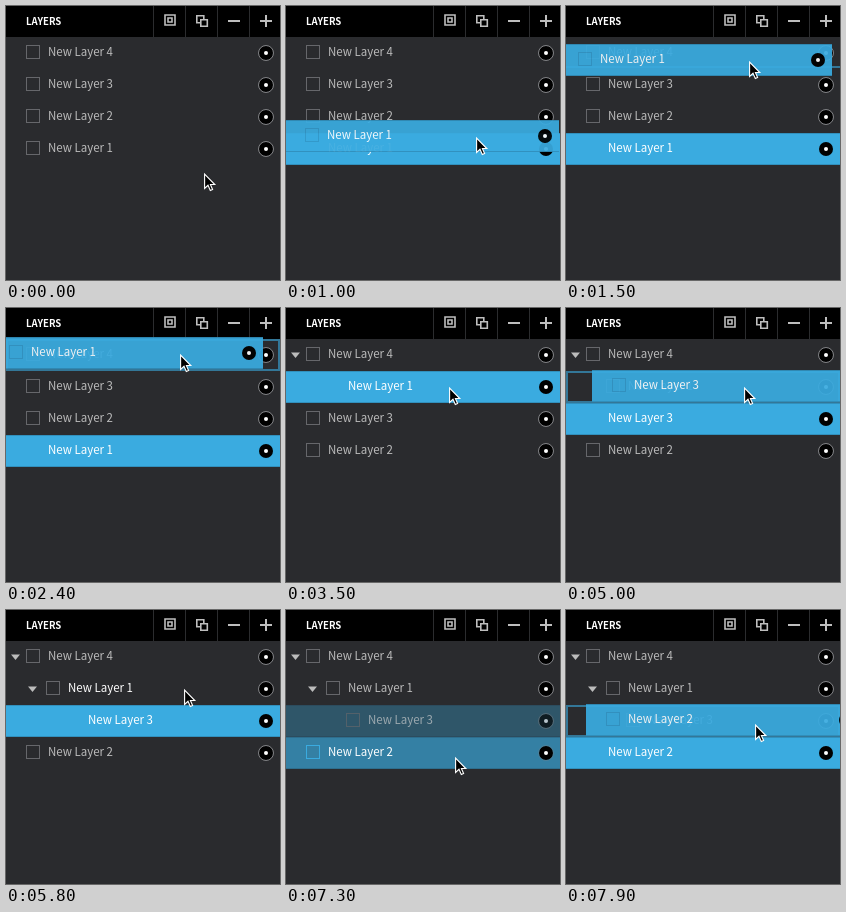
These frames come from a looping animation (274 px wide and 274 px high, 8000 ms). An HTML page:

```html
<!DOCTYPE html>
<html lang="en">
<head>
<meta charset="utf-8">
<title>Layers panel</title>
<style>
  html, body { margin: 0; width: 100%; height: 100%; overflow: hidden; background: #2a2b2e; }
  svg { display: block; width: 100vw; height: 100vh; }
  text { font-family: "Noto Sans CJK SC", "Noto Sans CJK JP", "Noto Sans CJK", "Open Sans", sans-serif; }
  .label { font-size: 11.5px; }
  .title { font-size: 9.6px; font-weight: 700; fill: #fff; }
</style>
</head>
<body>
<svg viewBox="0 0 274 274">
  <rect width="274" height="31"/>
  <text class="title" x="20" y="19">LAYERS</text>
  <path d="M147.5 0V31M179.5 0V31M211.5 0V31M243.5 0V31" stroke="#2b2c2e"/>
  <g fill="none" stroke="#bebebe" stroke-width="1.6">
    <path d="M159 9h10v10h-10zM162 12h4v4h-4z"/>
    <path d="M190.800 9.800h7v7h-7z"/>
    <path d="M194.800 13.800h6.500v6.500h-6.500z" fill="#000"/>
    <path d="M222 15h12M254 15h12M260 9v12" stroke-width="2"/>
  </g>
  <g id="scene"></g>
  <path id="cursor" d="M.6 1.2V15.500L4 12.300 6.300 17.500 8.600 16.500 6.400 11.500H10.800Z"
        fill="#000" stroke="#fff" stroke-width="1.1"/>
</svg>
<script>
const LOOP = 8000, STEP = 100, ROW = 32, TOP = 31, BLUE = '#3aabe0';
const scene = document.getElementById('scene');
const cursor = document.getElementById('cursor');

// the pointer eases from rest to rest
const origin = { x: 198, y: 167 };
const moves = [
  { from: 0, to: 500, x: 191, y: 144 },
  { from: 800, to: 1700, x: 182, y: 42 },
  { from: 1700, to: 2400, x: 174, y: 46 },
  { from: 3100, to: 3900, x: 152, y: 112 },
  { from: 4200, to: 4400, x: 158, y: 96 },
  { from: 4400, to: 5000, x: 178, y: 79 },
  { from: 6300, to: 7200, x: 169, y: 147 },
  { from: 7400, to: 7900, x: 189, y: 114 }
];

// each drag moves one layer into the row above it
const drags = [
  { id: 1, press: 600, drop: 2600 },
  { id: 3, press: 4200, drop: 5600 },
  { id: 2, press: 7300, drop: LOOP }
];

const clamp = v => Math.max(0, Math.min(1, v));
const smooth = u => u * u * (3 - 2 * u);
const mix = (a, b, k) => a + (b - a) * k;

function pointerAt(t) {
  let p = origin;
  for (const { from, to, x, y } of moves) {
    const k = smooth(clamp((t - from) / (to - from)));
    p = { x: mix(p.x, x, k), y: mix(p.y, y, k) };
  }
  return { x: Math.round(p.x), y: Math.round(p.y) };
}

function layersAt(t) {
  const nested = t >= drags[0].drop, deep = t >= drags[1].drop;
  return [
    { id: 4, indent: 0, arrow: nested && 9.5 },
    ...(nested ? [{ id: 1, indent: 1, arrow: deep && 26.5 }] : []),
    { id: 3, indent: deep ? 2 : 0 },
    { id: 2, indent: 0 },
    ...(nested ? [] : [{ id: 1, indent: 0 }])
  ].map((layer, row) => ({ ...layer, row, y: TOP + row * ROW }));
}

// strength of a row's highlight, and whether it is fading away
function selection(id, t) {
  const i = drags.findIndex(d => d.id === id);
  if (i < 0 || t < drags[i].press) return { sel: 0 };
  const fade = from => clamp((t - from + 200) / 300);
  const { press, drop } = drags[i], next = drags[i + 1];
  if (next && t >= next.press) return { sel: 1 - fade(next.press), leaving: true };
  return { sel: t >= drop ? clamp((t - drop + 100) / 300) : fade(press) };
}

function layerRow({ id, indent, arrow }, x, y, { sel, leaving, hover, ghost }) {
  const left = 20 + indent * 20;
  const grey = Math.round(mix(188, 255, hover ? 1 : sel));
  const box = ghost ? '#3398c9' : sel > .5 ? BLUE : '#66676b';
  return `<g transform="translate(${x} ${y})" opacity="${ghost ? .93 : 1}">
    <g opacity="${sel}">
      <rect width="274" height="32" fill="${BLUE}"/>
      <path d="M0 .5H274M0 31.500H274" stroke="#000" opacity=".15"/>
    </g>
    <g opacity="${leaving ? 1 - sel : 1}">
      ${arrow ? `<path d="M${arrow - 4.5} 13.500h9l-4.500 5.500z" fill="#bcbcbc"/>` : ''}
      <rect x="${left + .5}" y="8.5" width="13" height="13" fill="none" stroke="${box}"/>
      <text class="label" x="${left + 22}" y="19" fill="rgb(${grey},${grey},${grey})">New Layer ${id}</text>
      <circle cx="260" cy="16" r="7"/>
      <circle cx="260" cy="16" r="7.5" fill="none" stroke="#808184" opacity="${1 - sel}"/>
      <circle cx="260" cy="16" r="2" fill="#fff"/>
    </g>
  </g>`;
}

// a line below the row near its lower edge, a frame around it elsewhere
function dropMark(row, pointerY) {
  const y = TOP + row * ROW;
  const shape = pointerY - y > ROW * .7 ? `M0 ${y + 30}H274` : `M1 ${y + 1}H273V${y + 31}H1Z`;
  return `<path d="${shape}" fill="none" stroke="${BLUE}" stroke-width="2" opacity=".6"/>`;
}

function draw(t) {
  const p = pointerAt(t), layers = layersAt(t);
  const overRow = Math.floor((p.y - TOP) / ROW);
  const drag = drags.find(d => t > d.press + STEP && t < d.drop);
  let out = layers.map(l => layerRow(l, 0, l.y,
    { ...selection(l.id, t), hover: !drag && l.row === overRow })).join('');
  if (drag) {
    const held = layers.find(l => l.id === drag.id);
    const grab = pointerAt(drag.press);
    if (overRow !== held.row) out += dropMark(overRow, p.y);
    if (p.x !== grab.x || p.y !== grab.y)
      out += layerRow(held, p.x - grab.x, held.y + p.y - grab.y, { sel: 1, ghost: true });
  }
  scene.innerHTML = out;
  cursor.setAttribute('transform', `translate(${p.x} ${p.y})`);
}

const begin = performance.now();
let shown = -1;
function tick() {
  const t = Math.floor((performance.now() - begin) % LOOP / STEP) * STEP;
  if (t !== shown) draw(shown = t);
  requestAnimationFrame(tick);
}
tick();
</script>
</body>
</html>
```
